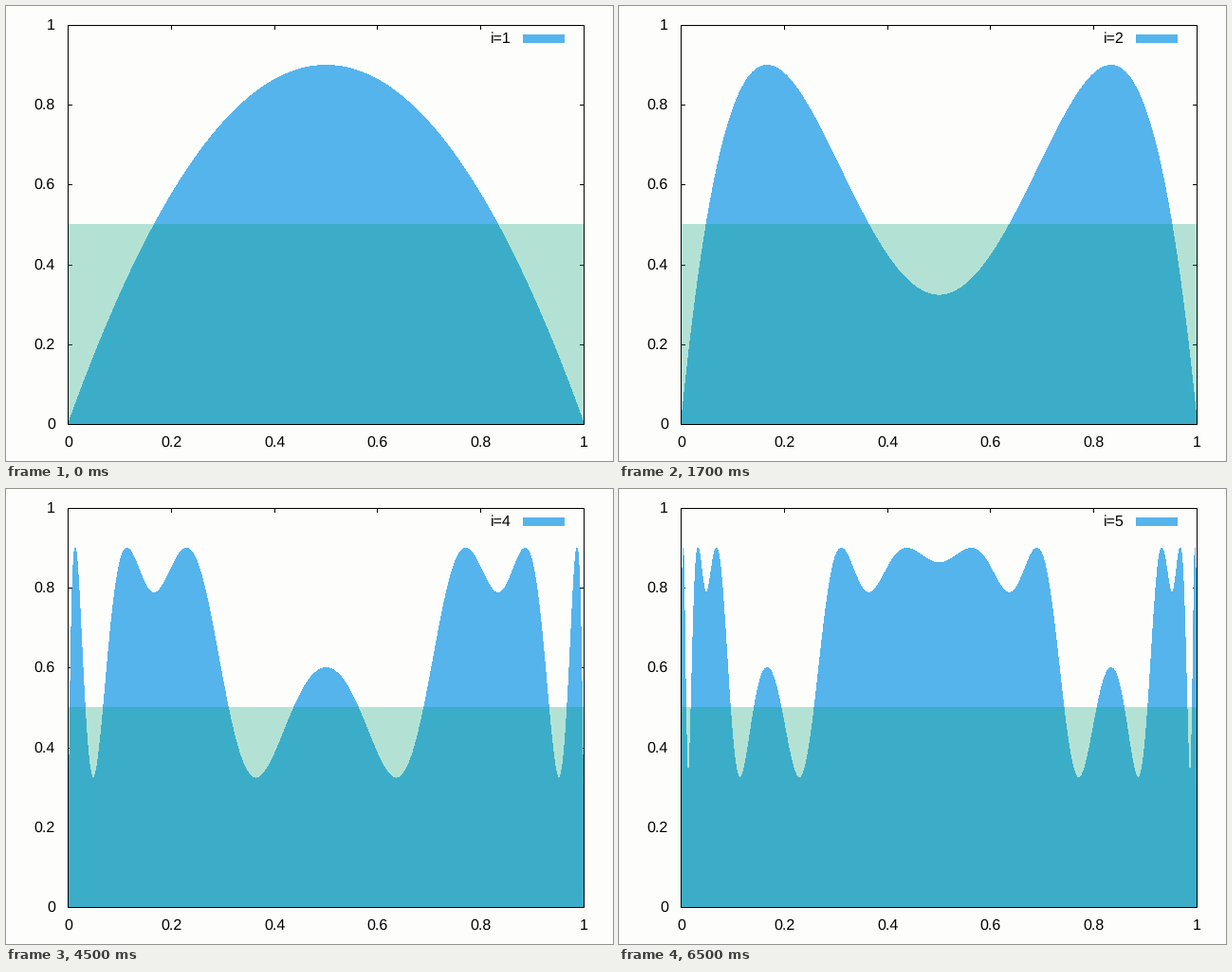
Animation of 640 by 480 pixels, one loop 8000 ms. Source, as a matplotlib script:

```python
import numpy as np
import matplotlib.pyplot as plt
from matplotlib.animation import FuncAnimation
from matplotlib.patches import Polygon, Rectangle

PX = 0.9  # points per pixel at 80 dpi
LEFT, RIGHT, TOP, BOTTOM = 65.5, 609.5, 20.5, 441.5
WIDTH, HEIGHT = RIGHT - LEFT, BOTTOM - TOP
BLUE, GREEN = "#55b4ec", "#009e73"
R = 3.6
TICK = 4.5

plt.rcParams["font.family"] = "Liberation Sans"
plt.rcParams["text.hinting"] = "no_hinting"
fig = plt.figure(figsize=(8, 6), dpi=80, facecolor="#fdfefc")
ax = fig.add_axes([0, 0, 1, 1])
ax.set_xlim(0, 640)
ax.set_ylim(480, 0)
ax.axis("off")


def tick(xs, ys):
    ax.plot(xs, ys, color="black", lw=PX, zorder=1, solid_capstyle="butt",
            snap=False)


def label(x, y, text, align):
    return ax.text(x, y, text, ha=align, va="baseline", size=16 * PX, zorder=6)


def bar(x, y, width, height, **style):
    ax.add_patch(Rectangle((x, y), width, height, snap=False, **style))


def logistic(x, times):
    for _ in range(times):
        x = R * x * (1 - x)
    return x


# Each pixel column reaches the highest value inside it.
columns = np.arange(66, 609)
spread = np.linspace(-0.48, 0.48, 25)
samples = (columns[:, None] + 0.5 + spread - LEFT) / WIDTH
edges = np.column_stack([columns, columns + 1]).ravel()


def outline(times):
    heights = logistic(samples, times).max(axis=1)
    tops = np.repeat(np.round(BOTTOM - 0.5 - HEIGHT * heights), 2)
    body = np.column_stack([edges, tops])
    return np.vstack([[edges[0], BOTTOM], body, [edges[-1], BOTTOM]])


for k in range(6):
    value = f"{k / 5:g}"
    x = np.floor(LEFT + WIDTH * k / 5) + 0.5
    y = np.floor(BOTTOM - HEIGHT * k / 5) + 0.5
    label(x, 465, value, "center")
    label(52, y + 4.5, value, "right")
    if 0 < k < 5:
        tick([x, x], [TOP, TOP + TICK])
        tick([x, x], [BOTTOM - TICK, BOTTOM])
        tick([LEFT, LEFT + TICK], [y, y])
        tick([RIGHT - TICK, RIGHT], [y, y])

area = ax.add_patch(Polygon(outline(1), closed=True, fc=BLUE, lw=0,
                            antialiased=False, snap=False, zorder=2))
bar(66, 230, 543, 211, fc=GREEN, alpha=0.29, lw=0, zorder=3)
bar(545, 30, 44, 9, fc=BLUE, lw=0, zorder=4)
bar(LEFT, TOP, WIDTH, HEIGHT, fc="none", ec="black", lw=PX, zorder=5)
legend = label(533, 39, "i=1", "right")


def update(frame):
    times = (frame + 3) // 4 + 1
    area.set_xy(outline(times))
    legend.set_text(f"i={times}")
    return area, legend


anim = FuncAnimation(fig, update, frames=16, interval=500, repeat=True,
                     repeat_delay=0)
plt.show()
```
